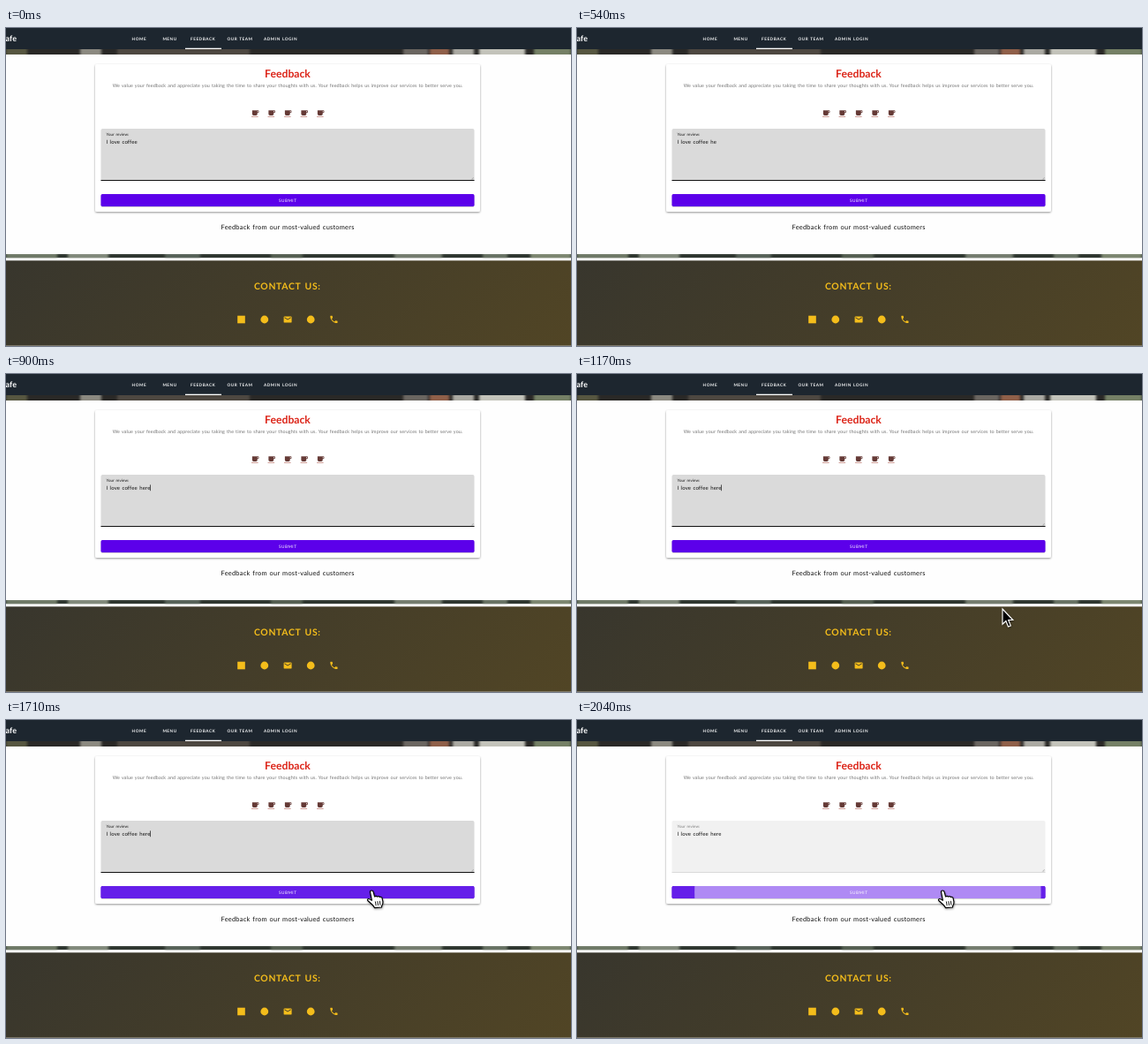
Recreate the animation shown at these times as an HTML page. Size 640x360 px, loop 2070 ms.

```html
<!DOCTYPE html>
<html lang="en">
<head>
<meta charset="utf-8">
<title>Feedback form</title>
<style>
  html, body { margin: 0; width: 100%; height: 100%; overflow: hidden; background: #fefefe; }
  svg { display: block; width: 640px; height: 360px; }
  text { font-family: Lato, "Open Sans", sans-serif; text-rendering: geometricPrecision; white-space: pre; word-spacing: .1em; }
  .mid { text-anchor: middle; }
  .nav { font-size: 4.7px; letter-spacing: .52px; font-weight: 700; fill: #f4f5f6; }
  .title { font-size: 12.2px; font-weight: 700; fill: #dc2418; }
  .lead { font-size: 5.4px; letter-spacing: .1px; fill: #747474; }
  .label { font-size: 4.5px; letter-spacing: .08px; }
  .review { font-size: 6px; letter-spacing: .15px; fill: #111; }
  .submit { font-size: 4.7px; letter-spacing: .5px; fill: #fff; }
  .sub { font-size: 7.4px; letter-spacing: .25px; fill: #111; }
  .contact { font-size: 10.4px; font-weight: 700; letter-spacing: .7px; }
</style>
</head>
<body>
<svg viewBox="0 0 640 360">
  <defs>
    <linearGradient id="footer" gradientUnits="userSpaceOnUse" x1="0" y1="263" x2="368" y2="631">
      <stop offset="0" stop-color="#38362d"/><stop offset="1" stop-color="#514525"/>
    </linearGradient>
    <filter id="shadow" x="-5%" y="-10%" width="110%" height="125%">
      <feDropShadow dx="0" dy="1" stdDeviation="1.3" flood-opacity=".42"/>
    </filter>
    <filter id="lift" x="-2%" y="-20%" width="104%" height="150%">
      <feDropShadow dx="0" dy=".6" stdDeviation=".6" flood-opacity=".25"/>
    </filter>
    <filter id="soft" x="-40%" y="-40%" width="190%" height="190%">
      <feDropShadow dx=".4" dy="1.2" stdDeviation=".9" flood-opacity=".4"/>
    </filter>
    <filter id="blur" x="-5%" y="-50%" width="110%" height="200%"><feGaussianBlur stdDeviation="1.6 .4"/></filter>
    <clipPath id="buttonClip"><rect x="107.5" y="188" width="423" height="14" rx="1.7"/></clipPath>
    <clipPath id="photoClip"><path d="M0 24h640v6H0zM0 256h640v4.300H0z"/></clipPath>
    <g id="cup">
      <path d="M20 3H4v10c0 2.210 1.790 4 4 4h6c2.210 0 4-1.790 4-4v-3h2c1.110 0 2-.89 2-2V5c0-1.110-.89-2-2-2zm0 5h-2V5h2z" fill="#653a36"/>
      <path d="M2 19h18v2H2z" fill="#c08078"/>
    </g>
  </defs>

  <rect width="640" height="360" fill="#fefefe"/>
  <g clip-path="url(#photoClip)">
    <rect y="24" width="640" height="6" fill="#292826"/>
    <rect y="256" width="640" height="4.300" fill="#303831"/>
    <g id="photo" filter="url(#blur)"></g>
  </g>
  <rect width="640" height="24" fill="#1d262f"/>
  <text x="-.4" y="15.200" font-size="9" font-weight="700" fill="#fff">afe</text>
  <g id="nav" class="nav"></g>
  <rect x="203" y="22.700" width="41" height="1.300" fill="#fff"/>

  <rect x="101" y="41" width="436" height="167" rx="2" fill="#fff" filter="url(#shadow)"/>
  <text class="title mid" x="319" y="55.600">Feedback</text>
  <text class="lead mid" x="319" y="67">We value your feedback and appreciate you taking the time to share your thoughts with us. Your feedback helps us improve our services to better serve you.</text>
  <g id="cups"></g>

  <path id="field" d="M107.500 173V116q0-2 2-2h419q2 0 2 2v57z"/>
  <rect id="line" x="107.500" y="172" width="423" height="1"/>
  <path d="M527.200 171.600l2.400-2.400M528.700 171.600l.9-.9" stroke="#777" stroke-width=".5"/>
  <text id="label" class="label" x="113.500" y="122">Your review:</text>
  <text id="review" class="review" x="113.500" y="131"></text>
  <rect id="caret" x="163.300" y="125.400" width=".7" height="6.800" fill="#151515"/>

  <rect x="107.500" y="188" width="423" height="14" rx="1.700" fill="#5b00ea" filter="url(#lift)"/>
  <g clip-path="url(#buttonClip)">
    <rect id="hover" x="107.500" y="188" width="423" height="14" fill="#651fe9"/>
    <circle id="ripple" cy="195" fill="#fff"/>
  </g>
  <text class="submit mid" x="319.200" y="196.700">SUBMIT</text>
  <text class="sub mid" x="319.100" y="228">Feedback from our most-valued customers</text>

  <rect y="263.300" width="640" height="96.700" fill="url(#footer)"/>
  <rect y="359.200" width="640" height=".8" fill="#8b8679"/>
  <g fill="#f4bd1b">
    <text class="contact mid" x="318.800" y="296.400">CONTACT US:</text>
    <rect x="262.200" y="325.700" width="8.600" height="8.600"/>
    <circle cx="292.800" cy="330" r="4.400"/>
    <circle cx="345.200" cy="330" r="4.400"/>
    <path transform="translate(313.700 324.600) scale(.45)" d="M20 4H4c-1.100 0-2 .9-2 2v12c0 1.100.9 2 2 2h16c1.100 0 2-.9 2-2V6c0-1.100-.9-2-2-2zm0 4l-8 5-8-5V6l8 5 8-5z"/>
    <path transform="translate(365.900 324.400) scale(.46)" d="M6.600 10.800c1.400 2.800 3.800 5.100 6.600 6.600l2.200-2.200c.3-.3.7-.4 1-.2 1.100.4 2.300.6 3.600.6.6 0 1 .4 1 1V20c0 .6-.4 1-1 1C10.600 21 3 13.400 3 4c0-.6.4-1 1-1h3.500c.6 0 1 .4 1 1 0 1.200.2 2.400.6 3.600.1.3 0 .7-.3 1z"/>
  </g>

  <g id="cursor" filter="url(#soft)">
    <path id="arrow" d="M0 0V17.200L3.900 13.500 6.500 20 9.200 18.900 6.600 12.500H11.800z" fill="#000" stroke="#fff" stroke-width="1.100"/>
    <g id="hand" fill="#fff" stroke="#000" stroke-width="1.200" stroke-linejoin="round" stroke-linecap="round">
      <path d="M-1.500 1.800Q-1.400-.2.300 0 1.700.1 2.200 1.800L3.600 7Q5.300 5.600 6.500 7.100 8.300 5.900 9.400 7.500 11.400 6.700 12.100 8.800L13 12.800Q13.200 15.300 11.700 17.300L11.500 19 3.500 19.600Q2.700 17.700.6 15.700L-3.900 11.700Q-5.300 9.900-3.500 9.500-2 9.400.4 11.200z"/>
      <path d="M4.400 12.800l.7 4M6.900 12.500l.6 4M9.400 12.200l.5 4" fill="none" stroke-width=".9"/>
    </g>
  </g>
</svg>
<script>
const LOOP = 2070, STEP = 30, PRESS = 1905;
const $ = id => document.getElementById(id);
const set = (id, attrs) => {
  for (const key in attrs) $(id).setAttribute(key, attrs[key]);
};
const show = (id, on) => set(id, { visibility: on ? "visible" : "hidden" });
const clamp = v => Math.min(1, Math.max(0, v));
const mix = (a, b, p) => a + (b - a) * p;
const grey = v => `rgb(${v},${v},${v})`;

// Flat patches of the blurred photo: [x, width, colour]
const patches = (y, list) => list.map(([x, w, fill]) =>
  `<rect x="${x}" y="${y}" width="${w}" height="6" fill="${fill}"/>`).join("");
$("photo").innerHTML = patches(24, [
  [0, 24, "#565641"], [84, 24, "#8b8980"], [126, 150, "#4d4740"], [450, 28, "#6b6560"],
  [480, 22, "#8f5e48"], [506, 24, "#aaa9a2"], [536, 52, "#c3c3ba"], [598, 42, "#758065"]
]) + patches(256, [
  [0, 58, "#6f7a68"], [70, 46, "#828a7b"], [180, 40, "#59645a"], [300, 36, "#566052"],
  [440, 54, "#757d70"], [540, 28, "#697365"], [594, 46, "#7d8771"]
]);

$("nav").innerHTML = [["HOME", 142.6], ["MENU", 177.4], ["FEEDBACK", 209], ["OUR TEAM", 250.4], ["ADMIN LOGIN", 292]]
  .map(([name, x]) => `<text x="${x}" y="13.500">${name}</text>`).join("");
$("cups").innerHTML = Array.from({ length: 5 }, (_, i) =>
  `<use href="#cup" transform="translate(${277.2 + i * 18.5} 91.900) scale(.42)"/>`).join("");

// [time, letters shown]
const typing = [[0, 13], [120, 15], [210, 16], [600, 17], [720, 18]];
// [time, x, y]
const path = [[1170, 482, 266], [1290, 449, 221], [1380, 432.5, 202.5], [1440, 432.5, 202.5], [1590, 414, 193]];

function ease(p) {
  // cubic-bezier(.4, 0, .2, 1), solved by bisection
  let lo = 0, hi = 1;
  for (let i = 0; i < 20; i++) {
    const u = (lo + hi) / 2, v = 1 - u;
    if (1.2 * u * v * v + .6 * u * u * v + u ** 3 < p) lo = u; else hi = u;
  }
  return 3 * lo * lo * (1 - lo) + lo ** 3;
}

function pointAt(t) {
  let i = 0;
  while (i < path.length - 2 && t > path[i + 1][0]) i++;
  const [a, b] = [path[i], path[i + 1]];
  const p = clamp((t - a[0]) / (b[0] - a[0]));
  return [mix(a[1], b[1], p), mix(a[2], b[2], p)];
}

function render(t) {
  const [, count] = typing.filter(([start]) => t >= start).pop();
  $("review").textContent = "I love coffee here".slice(0, count);
  show("caret", (t >= 720 && t < 1220) || (t >= 1690 && t < PRESS));

  const blur = clamp((t - PRESS) / 60);
  set("field", { fill: grey(Math.round(mix(218, 241, blur))) });
  set("line", { fill: "#111", opacity: 1 - .9 * clamp((t - PRESS) / 120) });
  set("label", { fill: grey(Math.round(mix(20, 125, blur))) });

  const [x, y] = pointAt(t);
  const over = t >= 1440 && y < 202;
  show("cursor", t >= path[0][0]);
  $("arrow").style.display = over ? "none" : "";
  $("hand").style.display = over ? "" : "none";
  set("cursor", { transform: `translate(${x} ${y})` });
  show("hover", over);

  const grow = ease(clamp((t - PRESS) / 225));
  set("ripple", {
    cx: mix(413, 317.5, grow),
    r: mix(127, 206, grow),
    opacity: .48 * clamp((t - PRESS) / 75)
  });
}

function tick() {
  render(Math.floor(performance.now() % LOOP / STEP) * STEP);
  requestAnimationFrame(tick);
}
tick();
</script>
</body>
</html>
```
